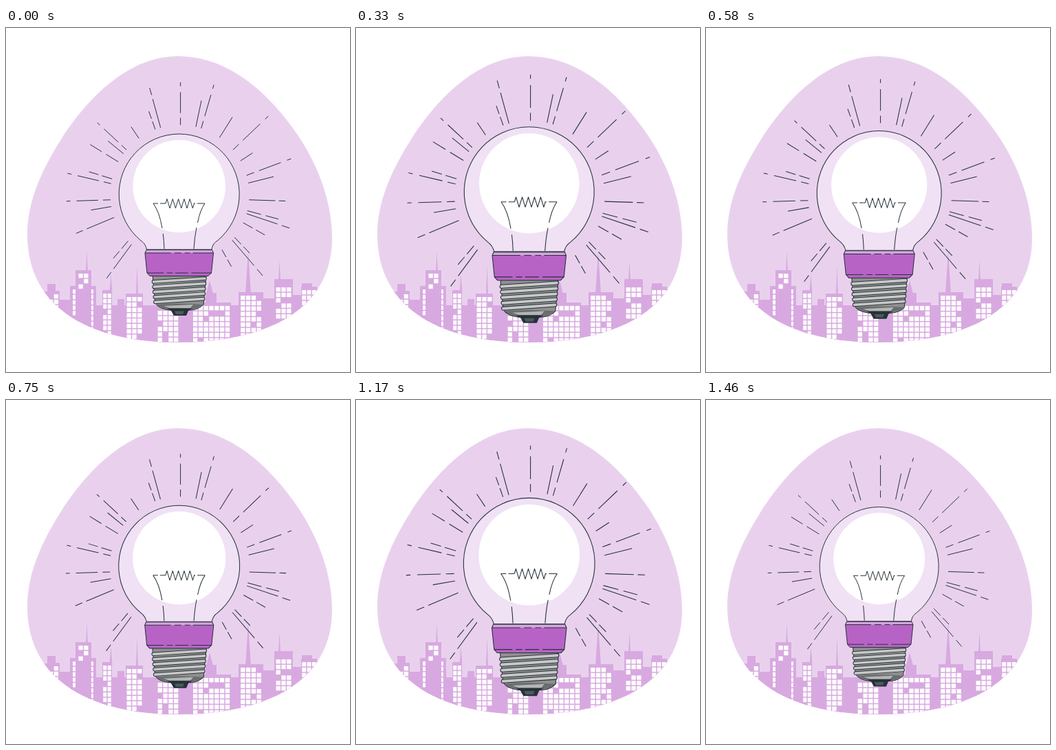
An HTML page with a canvas that plays this animation: 500 px wide and 500 px high, repeating every 1500 ms.

```html
<!DOCTYPE html>
<html>
<head>
<meta charset="utf-8">
<style>
html, body { margin: 0; width: 100%; height: 100%; overflow: hidden; background: #fff; }
canvas { display: block; width: 500px; height: 500px; }
</style>
</head>
<body>
<canvas id="stage" width="500" height="500"></canvas>
<script>
const ctx = document.getElementById('stage').getContext('2d');
const LOOP = 1500, STEPS = 36;
const INK = '#263238', PALE = '#e9d1ee', CITY = '#d8a9e0', PURPLE = '#b763c6';
const blob = new Path2D('M250 41C325 41 384 96 427 160C457 206 474 258 474 305C474 412 375 457 250 457C130 457 31 412 31 300C31 252 52 206 80 162C120 99 180 41 250 41Z');

// Glass radius over the loop: [step, radius], joined by smooth curves
const BASE_RADIUS = 87.5;
const pulse = [[0, 87.5], [8, 94.5], [10, 95.5], [14, 90.5], [18, 88], [20, 87.3], [24, 90.5], [28, 95.4], [35, 86.5]];

function knot(i) {
  const n = pulse.length, turn = Math.floor(i / n);
  const [step, radius] = pulse[i - turn * n];
  return [step + turn * STEPS, radius];
}

function slope(i) {
  const [a, ra] = knot(i - 1), [b, rb] = knot(i + 1);
  return (rb - ra) / (b - a);
}

function radiusAt(step) {
  let i = 0;
  while (knot(i + 1)[0] <= step) i++;
  const [a, ra] = knot(i), [b, rb] = knot(i + 1);
  const w = b - a, u = (step - a) / w, v = 1 - u;
  return ra * v * v * (1 + 2 * u) + rb * u * u * (1 + 2 * v) + w * u * v * (slope(i) * v - slope(i + 1) * u);
}

// Rays by number of dashes: [clockwise degrees from the top, length]
const solidRays = [[13.4, 39], [35, 35], [61, 21], [80.5, 38], [260, 30], [306, 29], [324, 20]];
const doubleRays = [
  [94.4, 53], [103.5, 47], [106, 66], [114, 36], [128, 32], [131, 68], [142.6, 28],
  [224, 61], [228, 33], [250.7, 60], [283, 35], [298, 48], [339.4, 28], [344, 60]
];
const tripleRays = [[0.6, 62], [18, 66], [50, 71], [74, 69], [265.6, 64], [279, 65], [310, 58]];

// Rays start on a ring round the glass and point away from a hub that rises for the lower ones
function ray([degrees, length], gaps) {
  const angle = degrees * Math.PI / 180;
  const x = 252.5 + 101 * Math.sin(angle), y = 242 - 101 * Math.cos(angle);
  const dx = x - 253.5, dy = y - 250 + 45 * Math.max(0, -Math.cos(angle));
  const k = length / Math.hypot(dx, dy);
  gappedLine(x, y, x + dx * k, y + dy * k, gaps);
}

function drawRays() {
  solidRays.forEach(r => ray(r, []));
  doubleRays.forEach(r => ray(r, r[1] > 50 ? [.72, .82] : [.44, .59]));
  tripleRays.forEach(r => ray(r, [.17, .28, .77, .91]));
}

function gappedLine(x1, y1, x2, y2, gaps) {
  const stops = [0, ...gaps, 1];
  const at = u => [x1 + (x2 - x1) * u, y1 + (y2 - y1) * u];
  ctx.beginPath();
  for (let i = 0; i < stops.length; i += 2) {
    ctx.moveTo(...at(stops[i]));
    ctx.lineTo(...at(stops[i + 1]));
  }
  ctx.stroke();
}

function shape(d, fill, stroke) {
  const path = new Path2D(d);
  if (fill) { ctx.fillStyle = fill; ctx.fill(path); }
  if (stroke) { ctx.strokeStyle = stroke; ctx.stroke(path); }
}

function seeded(seed) {
  return () => (seed = seed * 16807 % 2147483647) / 2147483647;
}

// A block down to the ground with a centred grid of windows, a few of them dark
function building(x, width, top, cols, rows, random) {
  const pitch = Math.min(7.8, (width - 1) / cols), left = x + (width - cols * pitch + 1.5) / 2;
  ctx.fillStyle = CITY;
  ctx.fillRect(x, top, width, 460 - top);
  ctx.fillStyle = '#fff';
  for (let i = 0; i < cols * rows; i++) {
    if (random() < .1) continue;
    ctx.fillRect(left + i % cols * pitch, top + 5 + Math.floor(i / cols) * 7.8, pitch - 1.5, 6.3);
  }
}

function spire(x, top, base, halfWidth) {
  shape(`M${x - halfWidth} ${base}L${x} ${top}L${x + halfWidth} ${base}Z`, CITY);
}

function drawCity() {
  const random = seeded(77);
  ctx.fillStyle = PALE;
  ctx.fill(blob);
  ctx.save();
  ctx.clip(blob);
  shape('M20 460V383H60V372H72V395H93V403H162V394H172V403H290V385H306V403H365V393H390V365H417V388H430V371H445V379H480V460Z', CITY);
  spire(117.5, 325, 355, 1.5);
  spire(152.5, 358, 385, 2);
  spire(190.5, 345, 388, 1.5);
  spire(296, 367, 386, 5);
  spire(352, 325, 386, 4);
  spire(397.5, 338, 367, 1.5);
  building(60, 18, 382, 2, 3, random);
  building(93, 38, 375, 4, 8, random);
  building(101, 23, 352, 2, 3, random);
  building(140, 14, 381, 2, 8, random);
  building(174, 25, 386, 3, 8, random);
  building(219, 33, 406, 4, 6, random);
  building(270, 57, 399, 7, 7, random);
  building(338, 36, 384, 4, 9, random);
  building(390, 27, 372, 3, 6, random);
  building(429, 23, 376, 3, 4, random);
  ctx.restore();
}

function drawFilament() {
  shape('M214 255H221M224 255H232M273 255H275M278 255H289', null, INK);
  let zigzag = 'M232 255';
  for (let i = 0; i < 10; i++) zigzag += `L${234 + i * 4.15} ${i % 2 ? 262 : 248.5}`;
  shape(zigzag + 'L273.5 255', null, INK);
  shape('M214 255Q223 267 227 291M228.3 299Q229.6 309 230 321M289 255Q282 265 278.5 283M277 290Q274 304 273 321', null, INK);
}

function drawScrew() {
  shape('M213 360H291L287 402Q280 409 269 410H237Q222 408 217 400Z', '#8f8f8f', INK);
  shape('M219 402Q250 399 286 402Q279 408 267 409H238Q224 407 219 402Z', '#6a6d6d');
  shape('M229 404L272 402L268 407H238Z', '#b5b5b5');
  ctx.lineCap = 'round';
  for (let i = 0; i < 5; i++) {
    const ridge = `M${214.5 + i * .6} ${368.8 + i * 7.4}L${289 - i * .6} ${364 + i * 7.4}`;
    ctx.lineWidth = 5.6;
    shape(ridge, null, INK);
    ctx.lineWidth = 3.7;
    shape(ridge, null, '#c7c7c7');
  }
  ctx.lineCap = 'butt';
  ctx.lineWidth = 1;
  shape('M234 407.5H271L265 411L262 418H244L240 411Z', INK);
  shape('M245 411.5H259L257 416H247Z', '#4c5a60');
}

function drawBulb() {
  const glass = 'M204.5 322C203 315 200 312 196 309A87.5 87.5 0 1 1 307.4 309C303 312 300 315 299 322Z';
  shape(glass, '#f0e1f5');
  ctx.beginPath();
  ctx.arc(251.7, 230, 67.3, 0, Math.PI * 2);
  ctx.fillStyle = '#fff';
  ctx.fill();
  shape(glass, null, INK);
  drawFilament();
  drawScrew();
  shape('M204 322.5H299.5L301.5 327H202Z', '#d3a4dd');
  shape('M202 327H301.5L298.5 356L294 360.5H209L205 356Z', PURPLE);
  shape('M202 327L204 322.5H299.5L301.5 327L298.5 356L294 360.5H209L205 356Z', null, INK);
  gappedLine(202, 327, 301.5, 327, [.38, .43, .53, .58, .66, .7]);
  gappedLine(205, 356, 298.5, 356, [.26, .31, .4, .44, .64, .69]);
}

function scaledAbout(x, y, scale, draw) {
  ctx.save();
  ctx.translate(x, y);
  ctx.scale(scale, scale);
  ctx.translate(-x, -y);
  ctx.strokeStyle = INK;
  ctx.lineWidth = 1;
  ctx.lineJoin = 'round';
  draw();
  ctx.restore();
}

const start = performance.now();
function frame() {
  const time = (performance.now() - start) % LOOP;
  const step = Math.floor((time + 5) / LOOP * STEPS) % STEPS;
  const scale = radiusAt(step) / BASE_RADIUS;
  ctx.clearRect(0, 0, 500, 500);
  drawCity();
  scaledAbout(253.5, 220.5, scale, drawRays);
  scaledAbout(251.7, 283, scale, drawBulb);
  requestAnimationFrame(frame);
}
frame();
</script>
</body>
</html>
```
